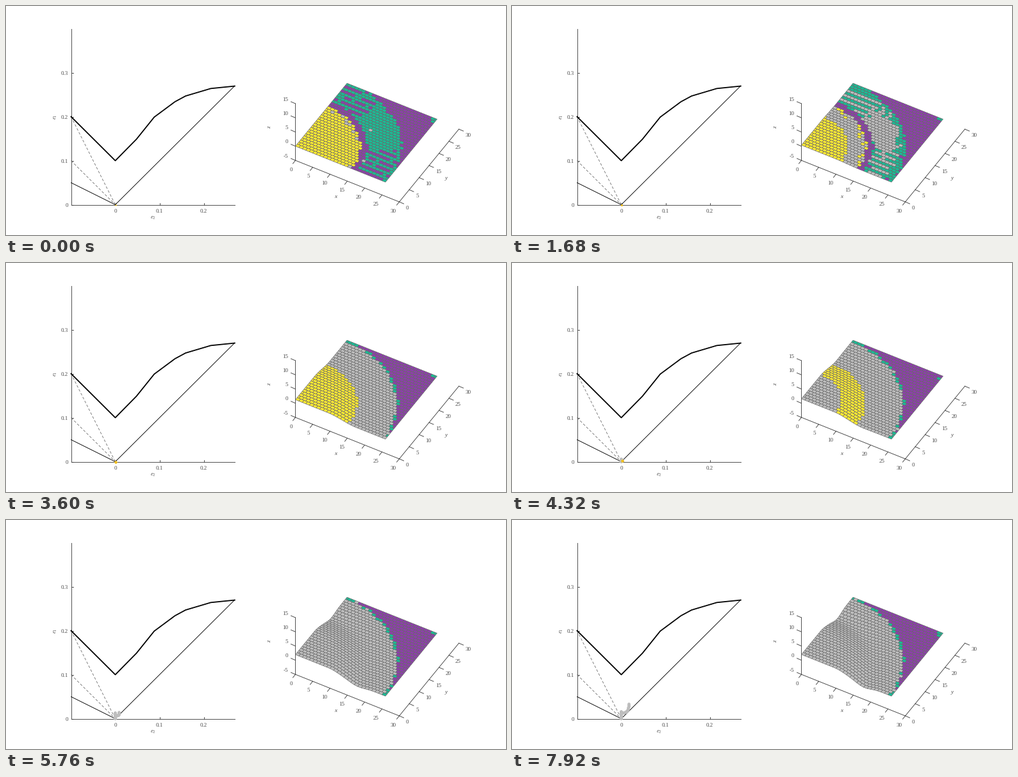
A matplotlib script that plays this animation: 780x359 px, repeating every 8 s.

```python
import numpy as np
import matplotlib.pyplot as plt
from matplotlib.animation import FuncAnimation
from matplotlib.collections import PolyCollection

W, H, DPI = 780, 359, 64
PX = 72 / DPI                      # points per pixel
SIDE = 26                          # side of the masonry plate
ROW_HEIGHT = np.sqrt(3) / 2
ROWS = round(SIDE / ROW_HEIGHT)
STEP_FRAMES = 3                    # 80 ms ticks per simulation step
INK, TEXT = "#404040", "#4a4a4a"
GREY, YELLOW, TEAL, PURPLE = range(4)
PALETTE = np.array([[190, 190, 190], [255, 235, 50],
                    [26, 188, 150], [142, 62, 172]]) / 255

plt.rcParams["font.family"] = "Liberation Serif"
plt.rcParams["mathtext.fontset"] = "stix"

fig = plt.figure(figsize=(W / DPI, H / DPI), dpi=DPI, facecolor="white")
ax = fig.add_axes([0, 0, 1, 1])
ax.set_xlim(0, W)
ax.set_ylim(H, 0)
ax.axis("off")


def ramp(t):
    return np.clip(t, 0, 1)


def smooth(t):
    t = ramp(t)
    return t * t * (3 - 2 * t)


def line(points, width=0.9, color=INK, **kw):
    x, y = np.transpose(points)
    ax.plot(x, y, color=color, lw=width * PX, **kw)


def label(x, y, s, size=9, **kw):
    kw = {"ha": "center", "va": "center", "color": TEXT, **kw}
    ax.text(x, y, s, fontsize=size * PX, **kw)


def strain(e2, e1):
    return 170.5 + 690 * e2, 311.5 - 690 * e1


def project(x, y, z=0):
    return 451.5 + 5.4 * x + 3.1 * y, 219.8 + 2.167 * x - 3.8 * y - 4.45 * z


def draw_strain_plot():
    line([strain(-0.1, 0.4), strain(-0.1, 0), strain(0.27, 0)])
    for v in (0, 0.1, 0.2, 0.3):
        x, y = strain(-0.1, v)
        line([(x, y), (x + 3, y)])
        label(97, y + 1.5, f"{v:g}", ha="right")
    for v in (0, 0.1, 0.2):
        x, y = strain(v, 0)
        line([(x, y), (x, y - 3)])
        label(x, 322.5, f"{v:g}")
    label(77, 174, r"$\varepsilon_1$", rotation=90)
    label(229, 332.5, r"$\varepsilon_2$")

    for top in (0.2, 0.1):
        line([strain(-0.1, top), strain(0, 0)], 0.8, "#666666",
             dashes=(5, 3.5))
    line([strain(-0.1, 0.05), strain(0, 0), strain(0.27, 0.27)], color="black")
    limit = [(-0.1, 0.2), (0, 0.1), (0.048, 0.149), (0.088, 0.199),
             (0.135, 0.234), (0.159, 0.247), (0.216, 0.264), (0.27, 0.2695)]
    line([strain(*p) for p in limit], 1.8, "black")


def draw_space_axes():
    line([project(0, 0, 15), project(0, 0, -5), project(30, 0, -5),
          project(30, 30, -5)])
    for v in range(0, 31, 5):
        x, y = project(v, 0, -5)
        line([(x, y), (x - 4, y + 5)])
        label(x - 4.5, y + 14.5, str(v), ha="right")
        x, y = project(30, v, -5)
        line([(x, y), (x + 7, y + 3)])
        label(x + 10, y + 10, str(v), ha="left")
    for v in range(-5, 16, 5):
        x, y = project(0, 0, v)
        line([(x, y), (x - 7, y - 3)])
        label(440, y - 6.5, str(v), ha="right")
    label(514, 299, "x", style="italic")
    label(687, 270, "y", style="italic")
    label(411, 190, "z", style="italic", rotation=90)


def make_bricks():
    """Corners and row numbers of a running bond, back row first."""
    bricks, rows = [], []
    for row in reversed(range(ROWS)):
        low, high = row * ROW_HEIGHT, (row + 1) * ROW_HEIGHT
        cuts = np.arange(SIDE + 1.0)
        if row % 2:
            cuts = np.r_[0, cuts[:-1] + 0.5, SIDE]
        for a, b in zip(cuts[:-1], cuts[1:]):
            bricks.append([(a, low), (b, low), (b, high), (a, high)])
            rows.append(row)
    return np.array(bricks), np.array(rows)


bricks, row = make_bricks()
cx, cy = bricks.mean(axis=1).T
radius = np.hypot(cx, cy)
corner_r = np.hypot(bricks[..., 0], bricks[..., 1])
off_diag = np.abs(np.arctan2(cy, cx) - np.pi / 4) / (np.pi / 4)
striped = off_diag > 0.42
u, v = np.random.default_rng(7).random((2, len(row)))

# order in which the middle zone unloads: diagonal first, rims last,
# every other course first where the pattern is striped
grain = np.where(striped, 0.35 * u + 0.65 * (row % 2), u)
delay = (0.45 * grain + 0.35 * off_diag + 0.4 * ((radius - 21.5) / 4) ** 2
         - 0.2 * ((np.abs(radius - 19) < 0.9) & ~striped))


def height(r, step):
    lift = 2 * smooth(step / 26)
    dip = 0.8 * smooth((step - 15) / 15)
    return (lift * (1 - smooth((r - 9.5) / 8))
            - dip * np.exp(-((r - 18.3) / 2.5) ** 2))


def phases(step):
    fade = ramp((step - 7) / 4)
    flick = (u + 0.618 * (step // 4)) % 1
    state = np.full(len(row), GREY)

    # middle zone: teal with purple courses away from the diagonal
    middle = (radius > 18) & (delay > 0.02 + 0.0104 * step ** 2)
    state[middle] = TEAL
    courses = striped & (row % 2 == 0)
    state[middle & courses & (v < 0.85 * (1 - step / 8))] = PURPLE

    # band between the middle zone and the core
    band = (radius > 16.3) & (radius <= 18)
    state[band & (u > 0.05 + fade)] = PURPLE

    # core: shrinks, grows back, then empties from the centre
    outer = min(11.7 + 0.47 * abs(step - 7), 16)
    inner = 16.4 * (1 - (1 - ramp((step - 15) / 8)) ** 2)
    state[(radius < outer) & (radius >= inner)] = YELLOW
    loose = (radius > 14.8) & (radius < 16.3 + fade) & (state == GREY)
    state[loose & (v < 0.8 * (1 - step / 15))] = YELLOW

    # far corner with a teal rim
    edge = 26.5 - 0.7 * ramp(step / 11) + 0.8 * (u - 0.5) * (1 - fade)
    state[radius > edge] = PURPLE
    state[(radius > 25.2) & (radius <= edge) & (flick < 0.8)] = TEAL
    state[(cx + cy > 49.8) & (flick < 0.6)] = TEAL
    return state


def strain_path(step):
    """Grey strain states: a short upright stem and a rising hook."""
    grow = ramp((step - 15) / 18)
    s = np.linspace(0, 1, 24)
    stem = np.c_[np.full_like(s, 170.2),
                 311 - 11 * ramp((step - 14) / 12) * s]
    low, tip = 311 - 8.5 * grow, 311 - 23.5 * grow ** 1.3
    hook = np.c_[170.5 + 11.5 * grow * (1 - (1 - s) ** 2.2),
                 low + (tip - low) * s ** 2]
    return stem, hook


draw_strain_plot()
draw_space_axes()
plate = PolyCollection([], edgecolors="#666666", linewidths=0.65 * PX,
                       zorder=4)
ax.add_collection(plate, autolim=False)
grey_dots, = ax.plot([], [], "o", ms=4.5 * PX, mew=0, zorder=5,
                     color=PALETTE[GREY])
gold_dots, = ax.plot([], [], "o", mew=0, zorder=6, color="#f0c020")


def update(frame):
    step = frame // STEP_FRAMES
    x, y = project(bricks[..., 0], bricks[..., 1], height(corner_r, step))
    plate.set_verts(np.stack([x, y], axis=-1))
    plate.set_facecolor(PALETTE[phases(step)])

    stem, hook = strain_path(step)
    grey_dots.set_data(*np.vstack([stem, hook]).T)
    grey_dots.set_visible(step > 15)
    gold_dots.set_data(*(hook[-6:] + [0, 1]).T)
    gold_dots.set_markersize((1.5 + 2.2 * ramp(step / 15)) * PX)
    gold_dots.set_visible(step < 23)
    return plate, grey_dots, gold_dots


anim = FuncAnimation(fig, update, frames=100, interval=80, repeat=True,
                     repeat_delay=0, blit=False)
plt.show()
```
